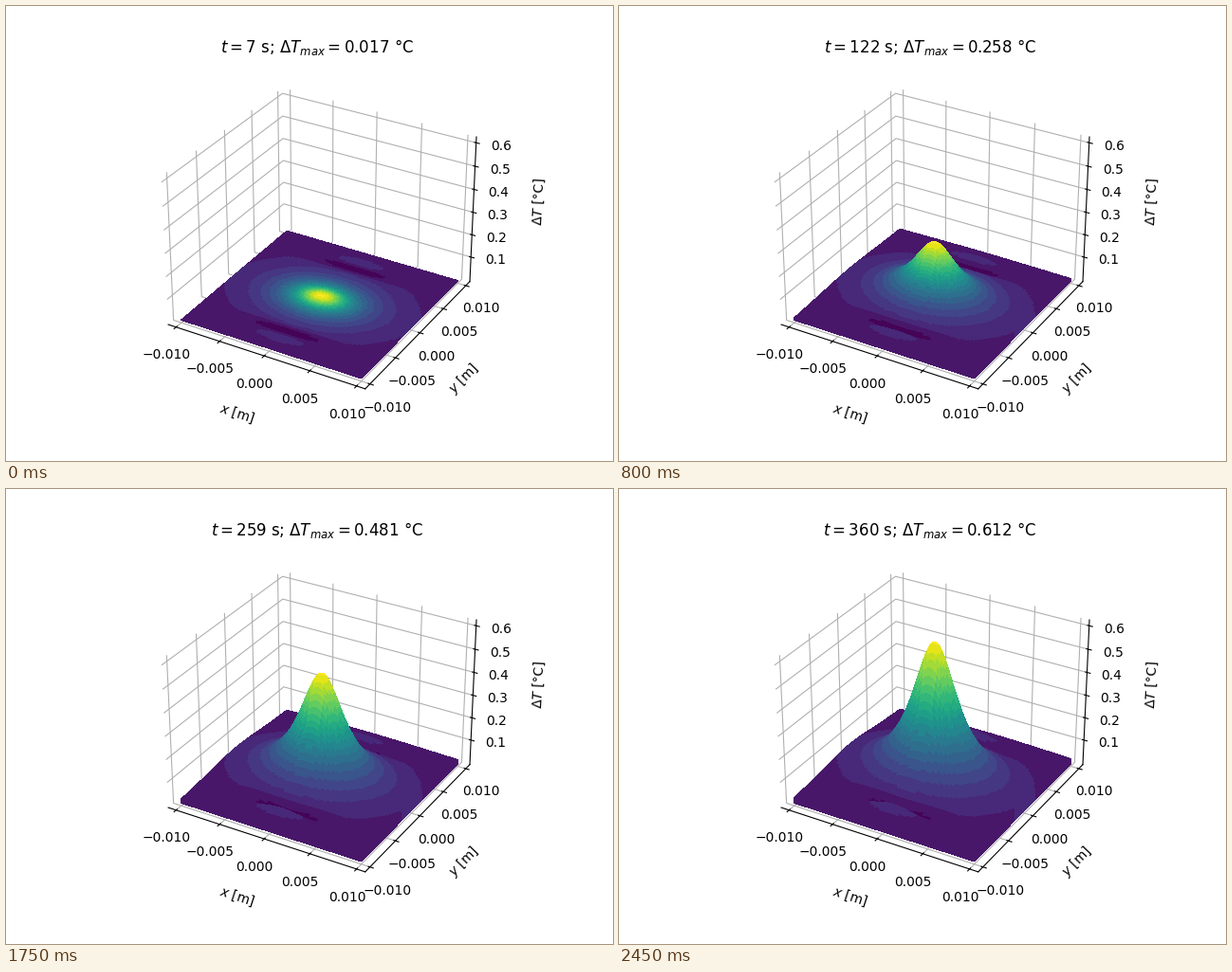
A matplotlib script for the animation above (2.5 s loop, 640 px wide and 480 px high).

```python
import numpy as np
import matplotlib.pyplot as plt
from matplotlib.animation import FuncAnimation
from matplotlib.collections import PolyCollection
from mpl_toolkits.mplot3d import proj3d

FRAMES, INTERVAL = 50, 50
STEP = 7.2            # simulated seconds per frame
HALF = 0.01           # half width of the plate in metres
NODES = 111
Z_MIN, Z_MAX = 0.001, 0.612
BAND, BAND_START = 0.05, 0.035


def peak(t):
    return 1.2119 * (1 - np.exp(-t / 512))


def bump(u, v, v0, su, sv):
    return np.exp(-(u / su) ** 2 - ((np.abs(v) - v0) / sv) ** 2)


def profile(u, v):
    """Relative heating on the plate, u and v running from -1 to 1."""
    s = 0.008 + 0.992 / (1 + (u / 0.30) ** 2 + (v / 0.215) ** 2)
    s -= 0.125 * bump(u, v, 0.66, 0.40, 0.075)
    s += 0.05 * bump(u, v, 0.79, 0.25, 0.085)
    return s


def band_colors(s):
    k = np.floor((s - BAND_START) / BAND)
    level = np.clip(BAND_START + (k + 0.5) * BAND, 0, 1)
    return plt.cm.viridis(level)


def style_axes(ax):
    side = HALF * (1 + 1 / 11)
    gap = (Z_MAX - Z_MIN) / 48
    ax.set_xlim(-side, side)
    ax.set_ylim(-side, side)
    ax.set_zlim(Z_MIN - gap, Z_MAX + gap)
    ax.set_xticks(np.linspace(-HALF, HALF, 5))
    ax.set_yticks(np.linspace(-HALF, HALF, 5))
    ax.set_zticks(np.arange(1, 7) / 10)
    for axis in (ax.xaxis, ax.yaxis, ax.zaxis):
        axis.set_pane_color((1, 1, 1, 0))
    ax.set_xlabel("$x$ [m]", labelpad=10)
    ax.set_ylabel("$y$ [m]", labelpad=10)
    ax.set_zlabel(r"$\Delta T$ [°C]", labelpad=10)


def quads(p):
    return np.stack([p[:-1, :-1], p[:-1, 1:], p[1:, 1:], p[1:, :-1]], axis=2).reshape(-1, 4, 2)


def wall(top, bottom):
    return np.stack([top[:-1], top[1:], bottom[1:], bottom[:-1]], axis=1)


fig = plt.figure(figsize=(6.4, 4.8), dpi=100)
ax = fig.add_subplot(projection="3d")
style_axes(ax)
fig.canvas.draw()
to_figure = ax.transData + fig.transFigure.inverted()

# Rows run from the far side to the near side, so drawing order hides what is behind.
line = np.linspace(-1, 1, NODES)
u, v = np.meshgrid(line, line[::-1])
shape = profile(u, v)


def project(z):
    x, y, _ = proj3d.proj_transform(u.ravel() * HALF, v.ravel() * HALF, z.ravel(), ax.get_proj())
    return to_figure.transform(np.column_stack([x, y])).reshape(NODES, NODES, 2)


cells = (shape[:-1, :-1] + shape[:-1, 1:] + shape[1:, 1:] + shape[1:, :-1]) / 4
colors = band_colors(np.concatenate([cells.ravel(), cells[-1], cells[:, -1]]))
floor = project(np.zeros_like(shape))

surface = PolyCollection([], facecolors=colors, edgecolors="none", linewidths=0,
                         antialiased=False, transform=fig.transFigure, zorder=2)
fig.add_artist(surface)


def update(i):
    t = STEP * (i + 1)
    top = project(peak(t) * shape)
    surface.set_verts(np.concatenate([
        quads(top),
        wall(top[-1], floor[-1]),
        wall(top[:, -1], floor[:, -1]),
    ]))
    ax.set_title(rf"$t = {int(t + 1e-6)}$ s; $\Delta T_{{max}} = {peak(t):.3f}$ °C")
    return [surface]


anim = FuncAnimation(fig, update, frames=FRAMES, interval=INTERVAL, repeat=True, repeat_delay=0)
plt.show()
```
